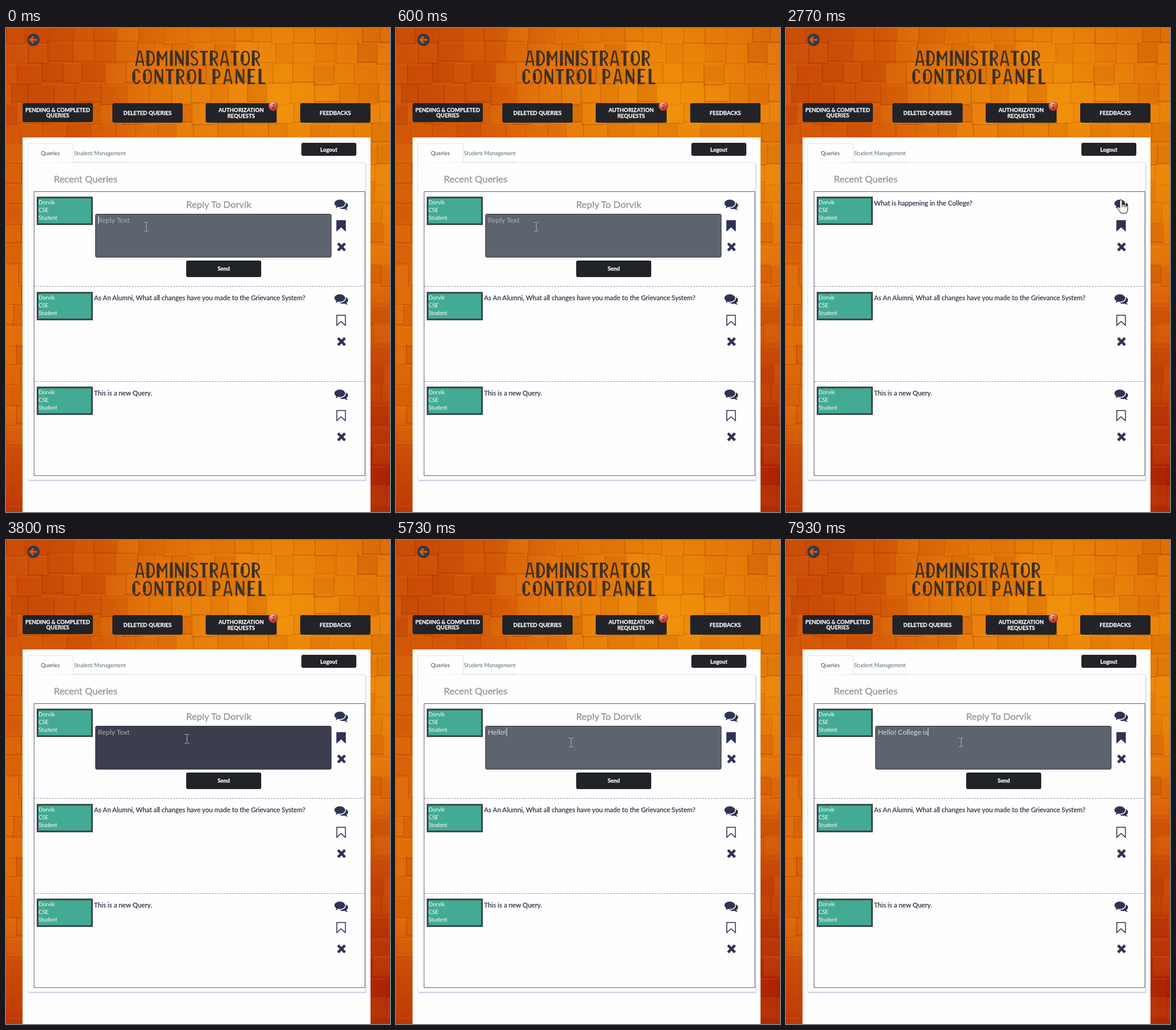
Write an HTML page with a canvas that moves like this. It is 650 by 818 pixels and loops after 8 s.

```html
<!DOCTYPE html>
<html lang="en">
<head>
<meta charset="utf-8">
<title>Administrator control panel</title>
<style>
html, body { margin: 0; width: 100%; height: 100%; overflow: hidden; background: #d65a06; }
canvas, svg { position: absolute; left: 0; top: 0; width: 650px; height: 818px; }
text { font-family: Lato, sans-serif; white-space: pre; }
.btn { fill: #212329; }
.label { fill: #fff; stroke: #fff; stroke-width: .25px; font-size: 9.3px; font-weight: 700; text-anchor: middle; }
.tab { font-size: 9.3px; fill: #454a5c; }
.tab.off { fill: #55707f; }
.head { font-size: 16px; fill: #9b9ba0; stroke: #9b9ba0; stroke-width: .45px; }
.query { font-size: 11.16px; fill: #30324a; stroke: #30324a; stroke-width: .25px; }
.user { font-size: 9.3px; fill: #fff; }
.input { font-size: 12px; }
.icon { fill: #2f3354; }
.thin, .thick { fill: none; stroke: #3a302a; stroke-linejoin: round; }
.thin { stroke-width: 2.7; }
.thick { stroke-width: 4.8; }
</style>
</head>
<body>
<canvas id="wall" width="650" height="818"></canvas>
<svg id="stage" viewBox="0 0 650 818">
  <defs>
    <radialGradient id="red" cx=".4" cy=".3" r=".8">
      <stop offset="0" stop-color="#ffc4b4"/>
      <stop offset=".5" stop-color="#e4523c"/>
      <stop offset="1" stop-color="#a42818"/>
    </radialGradient>
    <g id="chat">
      <path class="icon" d="M562 300a8.5 6 0 1 1 14 4.5q1 1.7 3 2.7q-3.5 .3 -6 -1.5a8.5 6 0 0 1 -11 -5.7z"/>
      <path class="icon" stroke="#fefefe" stroke-width="1.4" d="M565 289.3c5.5 0 9.8 3.2 9.8 7.1s-4.3 7.1 -9.8 7.1q-1.5 0 -3 -.3q-2.5 2 -6.2 2q2 -1.3 2.7 -3.4q-3.3 -2.2 -3.3 -5.4c0 -3.9 4.3 -7.1 9.8 -7.1z"/>
    </g>
    <path id="mark" d="M560 325.5H574.5V342.5L567.2 336L560 342.5Z"/>
    <path id="cross" d="M562 364L573.8 376M573.8 364L562 376" stroke="#2f3354" stroke-width="4.6"/>
  </defs>
  <g id="page"></g>
  <text id="question" class="query" x="149" y="300">What is happening in the College?</text>
  <g id="reply">
    <text class="head" x="305" y="304">Reply To Dorvik</text>
    <rect id="field" x="151.5" y="314.5" width="399" height="73" rx="2.5" stroke="#3c3f4a"/>
    <text id="typed" class="input" x="155.5" y="329"></text>
    <rect id="caret" y="317" width="1" height="15" fill="#e0e1e6"/>
    <rect class="btn" x="305" y="393" width="127" height="28" rx="3"/>
    <text class="label" x="368.5" y="410">Send</text>
  </g>
  <path id="beam" fill="none" stroke="#b2b3b4" d="M-3.5 -7.5H-1Q0 -7.5 .5 -6.5Q1 -7.5 2 -7.5H4M.5 -6.5V6.5M-3.5 7.5H-1Q0 7.5 .5 6.5Q1 7.5 2 7.5H4"/>
  <path id="hand" fill="#fff" stroke="#111" stroke-linejoin="round" d="M-2 .5Q0 -2 2 .5V8Q4 6 5.5 8Q7.5 6.5 8.5 9Q11 8 11.5 11V16Q11 19 9 22H0Q-3 17 -6 13.5Q-6.5 11 -4 11.5L-2 13.5ZM2 8V12M5.5 8V12M8.5 9V12.5"/>
</svg>
<script>
const $ = id => document.getElementById(id);
const LOOP = 8000;
const NAME = 'Dorvik';

// Wall of orange blocks
let seed = 17;
const rnd = () => (seed = (seed * 16807) % 2147483647) / 2147483647;
const ctx = $('wall').getContext('2d');

function glow(x, y, r, rgb, alpha) {
  const g = ctx.createRadialGradient(x, y, 0, x, y, r);
  g.addColorStop(0, `rgba(${rgb},${alpha})`);
  g.addColorStop(1, `rgba(${rgb},0)`);
  ctx.fillStyle = g;
  ctx.fillRect(0, 0, 650, 818);
}

function drawWall() {
  ctx.fillStyle = '#da6208';
  ctx.fillRect(0, 0, 650, 818);
  glow(460, 130, 320, '242,150,8', .85);
  glow(650, 260, 220, '240,146,6', .6);
  glow(0, 520, 170, '230,112,6', .5);
  glow(0, 60, 260, '190,58,4', .6);
  glow(650, 760, 320, '168,28,4', .95);
  glow(0, 818, 180, '180,40,4', .7);
  for (let y = -8; y < 818; y += 34) {
    for (let x = -30 * rnd(); x < 650;) {
      const w = 28 + 16 * rnd(), dy = 6 * rnd() - 3;
      const tone = rnd() < .5 ? '255,180,40' : '150,34,0';
      ctx.fillStyle = `rgba(${tone},${.12 * rnd()})`;
      ctx.fillRect(x, y + dy, w, 34);
      ctx.fillStyle = `rgba(130,34,0,${.1 + .2 * rnd()})`;
      ctx.fillRect(x, y + dy, 1.5, 34);
      ctx.fillRect(x, y + dy + 32, w, 2);
      ctx.fillStyle = 'rgba(255,196,80,.1)';
      ctx.fillRect(x + 1.5, y + dy, w - 2, 1.5);
      x += w;
    }
  }
}

// Title glyphs: [width, thin strokes, thick strokes], 26 units tall
const GLYPHS = {
  A: [16, 'M1.5 26L6.5 1.5H9.5L14.5 26M3 19H13', ''],
  D: [15, 'M3 1.5H7Q13.5 4 13.5 13T7 24.5H3', 'M3 0V26'],
  M: [20, 'M3 2L10 15L17 2V26', 'M3 26V1'],
  I: [6, '', 'M3 0V26'],
  N: [16, 'M2 26V1L14 25V0', 'M3 3L12 22'],
  S: [13, 'M11.5 5Q9 1 6 1.5Q1.5 2 1.5 7Q2 11 6.5 13Q11.5 15 11.5 19.5Q11 24.5 6 24.5Q2.5 24.5 1 21', ''],
  T: [14, 'M0 2H14', 'M7 1V26'],
  R: [15, 'M3 1.5H8Q13 3 13 8T7 14H3M7 14L13.5 26', 'M3 0V26'],
  O: [16, 'M8 1.5Q14.5 2 14.5 13T8 24.5Q1.5 24 1.5 13T8 1.5Z', 'M3 7V19'],
  C: [15, 'M13 7Q12 1.5 8 1.5Q2 2 2 13T8 24.5Q12 24 13 19', 'M3.5 6V20'],
  L: [12, 'M3 24.5H12', 'M3 0V26'],
  P: [14, 'M3 1.5H7Q12.5 3 12.5 9T7 15H3', 'M3 0V26'],
  E: [14, 'M3 1.5H13M3 13H11M3 24.5H13', 'M3 0V26']
};

function word(str, x, y, gap) {
  let out = '';
  for (const ch of str) {
    const [w, thin, thick] = GLYPHS[ch];
    out += `<g transform="translate(${x} ${y})"><path class="thin" d="${thin}"/><path class="thick" d="${thick}"/></g>`;
    x += w + gap;
  }
  return `<g role="img" aria-label="${str}">${out}</g>`;
}

const text = (cls, x, y, str) => `<text class="${cls}" x="${x}" y="${y}">${str}</text>`;
const rect = (x, y, w, h, attrs) => `<rect x="${x}" y="${y}" width="${w}" height="${h}" ${attrs}/>`;

function button(x, y, w, h, ...lines) {
  const top = y + h / 2 + 3.5 - (lines.length - 1) * 4.7;
  return rect(x, y, w, h, 'class="btn" rx="3"') +
    lines.map((s, i) => text('label', x + w / 2, top + i * 9.5, s)).join('');
}

function row(dy, saved) {
  const mark = saved ? 'class="icon"' : 'fill="none"';
  const group = (y, body) => `<g transform="translate(0 ${y})">${body}</g>`;
  return group(Math.ceil(dy),
    rect(53.5, 286.5, 92, 45, 'fill="#43ab94" stroke="#3f4a50" stroke-width="3"') +
    [NAME, 'CSE', 'Student'].map((s, i) => text('user', 55, 298 + i * 13, s)).join('')) +
    group(Math.floor(dy),
      `<use href="#chat"/><use href="#mark" ${mark} stroke="#2f3354" stroke-width="1.5"/><use href="#cross"/>`);
}

function drawPage() {
  const dashed = y => `<path d="M48 ${y}H607" stroke="#9497b4" stroke-dasharray="3 2"/>`;
  $('page').innerHTML =
    '<circle cx="46.5" cy="20" r="10.5" fill="#3a364a"/>' +
    '<path d="M53 20H41M46.5 14.5L41 20L46.5 25.5" fill="none" stroke="#d2620c" stroke-width="3"/>' +
    word('ADMINISTRATOR', 218.5, 38, 2.5) +
    word('CONTROL', 213, 69, 3.4) + word('PANEL', 349, 69, 4.5) +
    button(28, 127, 119, 32, 'PENDING &amp; COMPLETED', 'QUERIES') +
    button(180, 127, 119, 33, 'DELETED QUERIES') +
    button(338, 127, 120, 33, 'AUTHORIZATION', 'REQUESTS') +
    button(498, 127, 119, 33, 'FEEDBACKS') +
    '<circle cx="452.5" cy="132" r="8" fill="url(#red)"/>' +
    '<text x="452.5" y="135.5" font-size="9" text-anchor="middle" fill="#2a0c06">2</text>' +
    rect(28, 185, 589, 633, 'fill="#fefefe"') +
    rect(38, 229, 572, 537, 'fill="#d3d6e6"') +
    rect(36.5, 227.5, 572, 536, 'fill="#fefefe" stroke="#e4e6ee"') +
    '<path d="M36.5 228V195.5H113.5V227" fill="#fefefe" stroke="#e2e3e6"/>' +
    '<path d="M114 226.5H204" stroke="#e2e3e6"/>' +
    text('tab', 59, 215, 'Queries') + text('tab off', 115, 215, 'Student Management') +
    button(500, 194, 93, 22, 'Logout') +
    text('head', 81, 261, 'Recent Queries') +
    rect(47.5, 276.5, 560, 480, 'fill="none" stroke="#62667c"') +
    dashed(436.5) + dashed(597.5) +
    row(0, true) + row(160.5) + row(321) +
    text('query', 149, 460, 'As An Alumni, What all changes have you made to the Grievance System?') +
    text('query', 149, 621, 'This is a new Query.');
}

// Timeline
const MESSAGE = 'Hello! College is';
const KEYS = [4870, 5000, 5170, 5270, 5470, 5730, 5870, 6300, 6730, 6930, 7070, 7170, 7270, 7470, 7550, 7630, 7930];
const MOVES = [[0, 237, 336], [2030, 237, 336], [2570, 567, 291], [3799, 567, 291], [3800, 306, 336], [4050, 296, 342]];
const CLOSE = 2700, OPEN = 3800, FOCUS = 4050;
const IDLE = [60, 62, 78], ACTIVE = [94, 99, 112];

const clamp = v => Math.max(0, Math.min(1, v));
const mix = (a, b, k) => a + (b - a) * k;

function pointer(t) {
  let i = MOVES.length - 1;
  while (MOVES[i][0] > t) i--;
  const a = MOVES[i], b = MOVES[i + 1] || a;
  const k = b === a ? 0 : clamp((t - a[0]) / (b[0] - a[0]));
  const e = k * k * (3 - 2 * k);
  return [mix(a[1], b[1], e), mix(a[2], b[2], e)];
}

const show = (id, on) => $(id).setAttribute('visibility', on ? 'inherit' : 'hidden');

function render(t) {
  const open = t < CLOSE || t >= OPEN;
  show('reply', open);
  show('question', !open);

  const lit = t < CLOSE ? 1 : clamp((t - FOCUS) / 180);
  $('field').setAttribute('fill', `rgb(${IDLE.map((c, i) => Math.round(mix(c, ACTIVE[i], lit)))})`);

  const count = KEYS.filter(k => k <= t).length;
  const typed = MESSAGE.slice(0, count);
  $('typed').textContent = typed || 'Reply Text';
  $('typed').style.fill = typed ? '#dcdde2' : '#acaeb2';
  ctx.font = '12px Lato, sans-serif';
  $('caret').setAttribute('x', Math.round(155.5 + ctx.measureText(typed).width));
  show('caret', t < 600 || (t >= 1300 && t < CLOSE) || t >= FOCUS);

  const [x, y] = pointer(t);
  const over = x > 552;
  for (const id of ['beam', 'hand']) $(id).setAttribute('transform', `translate(${Math.round(x)} ${Math.round(y)})`);
  show('beam', !over);
  show('hand', over);
}

function tick() {
  render(performance.now() % LOOP);
  requestAnimationFrame(tick);
}

drawWall();
drawPage();
tick();
</script>
</body>
</html>
```
